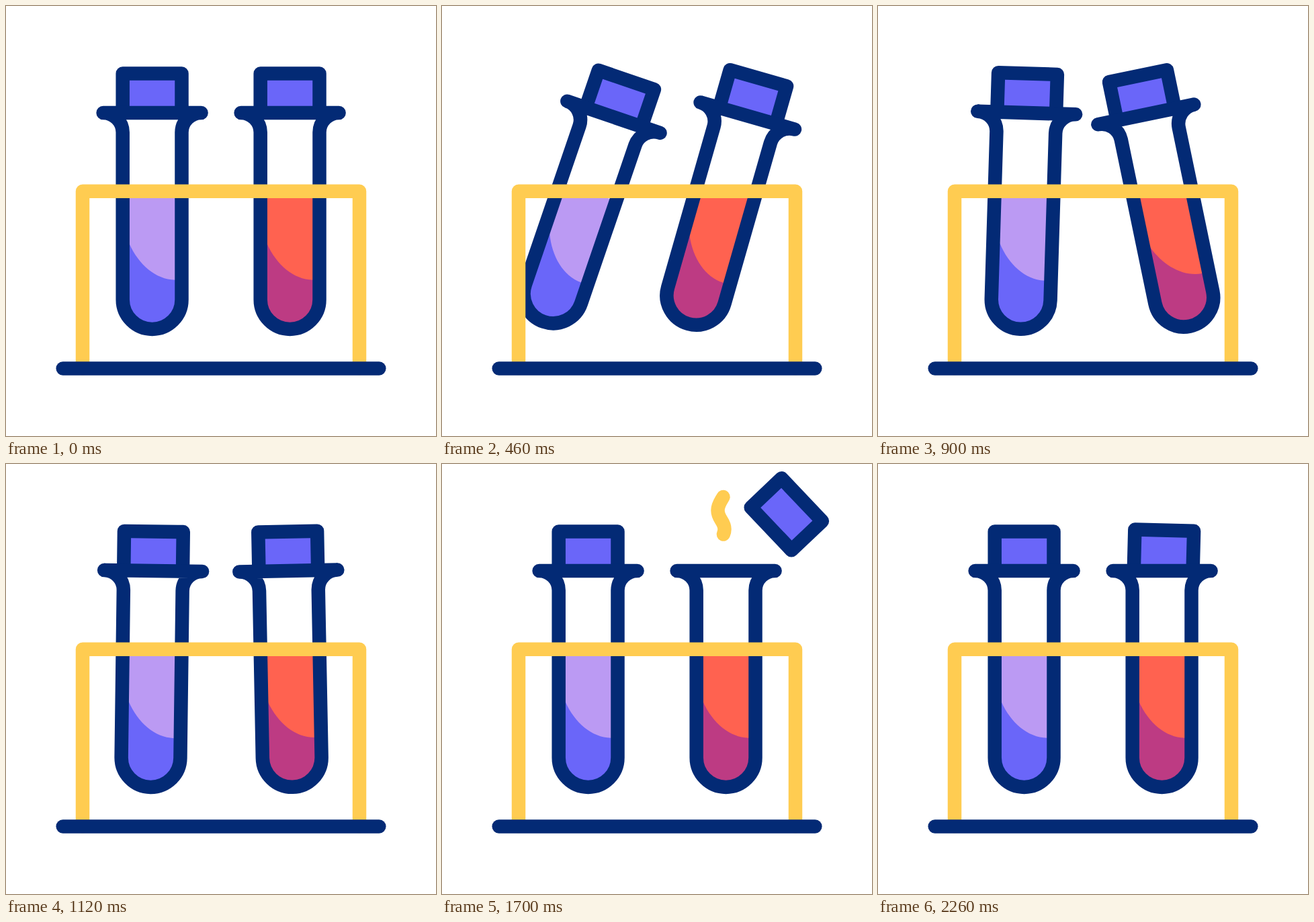
Animation, 640 px wide and 640 px high, one loop 2.4 s. Source, as an HTML page:

```html
<!DOCTYPE html>
<html lang="en">
<head>
<meta charset="utf-8">
<title>Test tubes</title>
<style>
  html, body { margin: 0; width: 100%; height: 100%; overflow: hidden; background: #fff; }
  svg { display: block; width: 100%; height: 100%; }
  .line { stroke: #032a75; }
  .rack, .steam { stroke: #ffcc51; }
  .line, .rack, .steam { fill: none; stroke-width: 20.5; stroke-linecap: round; stroke-linejoin: round; }
  .glass { fill: #fff; }
  .stopper { fill: #6a66f9; }
</style>
</head>
<body>
<svg viewBox="0 0 640 640">
  <g id="tubes"></g>
  <path id="steam" class="steam" pathLength="1"
    d="M410 125C410 112 420.5 109 420.5 97S410.5 82 410.5 69C410.5 60 416 54 418.5 49"/>
  <path class="rack" d="M114 539V275.8H526V539"/>
  <path class="line" d="M84.7 539.5H555.3"/>
</svg>
<script>
const LOOP = 2400;
const $ = id => document.getElementById(id);

// Each tube is drawn around its pivot on the rack's top bar.
const tube = (name, light, dark) => `
  <g id="${name}">
    <rect id="${name}Stopper" class="line stopper" x="-43.9" y="-175.5" width="87.8" height="63"/>
    <path class="glass" d="M-73 -117A29.3 29.3 0 0 1 -43.9 -88V161A43.9 43.9 0 0 0 43.9 161V-88A29.3 29.3 0 0 1 73 -117Z"/>
    <path fill="${light}" d="M-40 0H40V161H-40Z"/>
    <path fill="${dark}" d="M-40 63L-34 78C-20 109 5 131 34 131.7H40V161A40 40 0 0 1 -40 161Z"/>
    <path class="line" d="M-73 -117A29.3 29.3 0 0 1 -43.9 -88V161A43.9 43.9 0 0 0 43.9 161V-88A29.3 29.3 0 0 1 73 -117Z"/>
  </g>`;
$('tubes').innerHTML = tube('left', '#bb9af3', '#6a66f9') + tube('right', '#ff6250', '#bd3b83');

const smooth = u => u * u * (3 - 2 * u);
const accelerate = u => 1 - Math.cos(u * Math.PI / 2);
const progress = (t, from, to) => Math.min(1, Math.max(0, (t - from) / (to - from)));

// Keys are [time, value, easing into this key].
function track(keys, t) {
  let [lastTime, value] = keys[0];
  for (const [time, target, ease = smooth] of keys.slice(1)) {
    if (t < lastTime) break;
    const start = value;
    value = start + (target - start) * ease(progress(t, lastTime, time));
    if (t < time) break;
    lastTime = time;
  }
  return value;
}

const leftSwing = [[0, 0], [421, 20], [764, -10], [955, 4.6], [1140, 0, accelerate]];
const rightSwing = [[0, 0], [376, 20], [770, -13.8], [1140, 0, accelerate]];
const lift = [[1140, 0], [1520, 1], [2275, 0, accelerate]];

const place = (id, x, y, angle) =>
  $(id).setAttribute('transform', `translate(${x} ${y}) rotate(${angle})`);

function draw() {
  const t = performance.now() % LOOP;
  place('left', 217.6, 276, track(leftSwing, t));
  place('right', 422.6, 276, track(rightSwing, t));

  const f = track(lift, t);
  $('rightStopper').setAttribute('transform',
    `translate(${97 * f} ${-61.5 * f}) rotate(${50 * f} 0 -144)`);

  const head = smooth(progress(t, 1275, 1655));
  const tail = smooth(progress(t, 1570, 1950));
  const steam = $('steam').style;
  steam.display = head > tail ? '' : 'none';
  steam.strokeDasharray = `${head - tail} 2`;
  steam.strokeDashoffset = -tail;

  requestAnimationFrame(draw);
}
draw();
</script>
</body>
</html>
```
